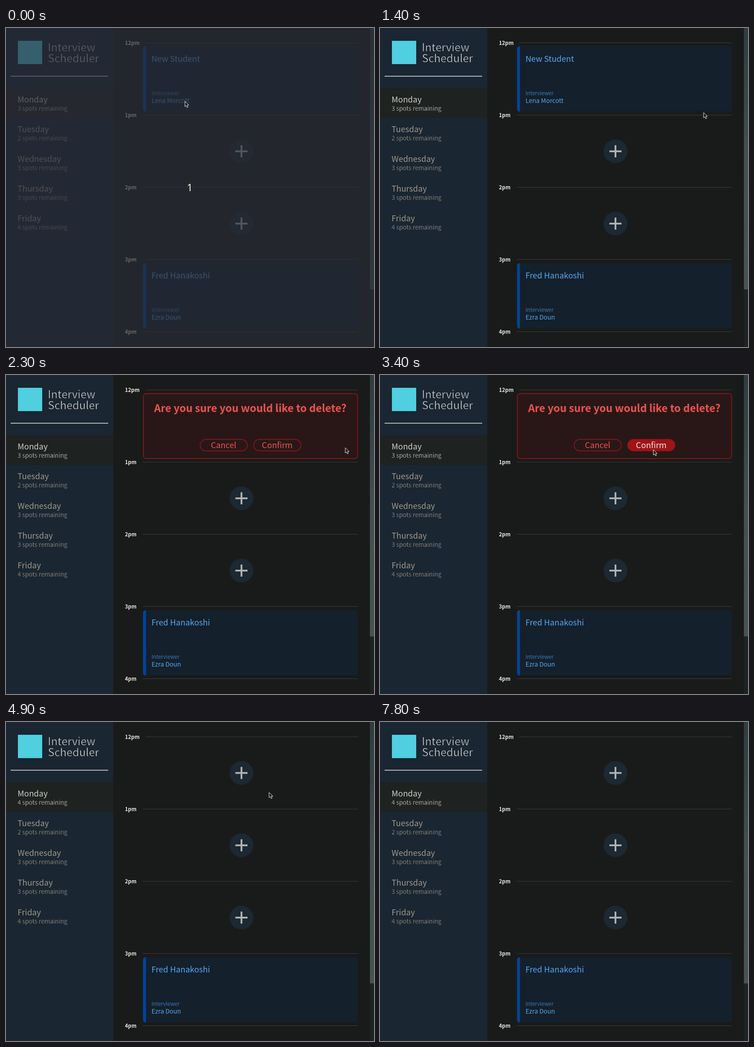
Recreate the animation shown at these times as an HTML page. Size 803 by 698 pixels, loop 8100 ms.

```html
<!DOCTYPE html>
<html lang="en">
<head>
<meta charset="utf-8">
<title>Scheduler</title>
<style>
  html, body { margin: 0; width: 100%; height: 100%; overflow: hidden; background: #191b1a; }
  svg { display: block; width: 803px; height: 698px; }
  text { font-family: "Noto Sans CJK JP", "Noto Sans CJK SC", "Noto Sans CJK KR", "Noto Sans", sans-serif; white-space: pre; }
</style>
</head>
<body>
<svg id="stage" viewBox="0 0 803 698" xmlns="http://www.w3.org/2000/svg">
  <defs>
    <linearGradient id="strip" x1="0" y1="0" x2="0" y2="1">
      <stop offset="0" stop-color="#2f3c40"/>
      <stop offset=".5" stop-color="#43504f"/>
      <stop offset="1" stop-color="#465350"/>
    </linearGradient>
  </defs>
</svg>
<script>
const NS = 'http://www.w3.org/2000/svg';
const stage = document.getElementById('stage');
const LOOP = 8100, STEP = 100, HOUR = 158.1;
const SIDE = '#1a2631', ROW = '#1e2220', PALE = '#e8e6e3', BLUE = '#004499', RED = '#a01316', CORAL = '#ef5350';

function add(parent, tag, attrs) {
  const el = document.createElementNS(NS, tag);
  for (const k in attrs) el.setAttribute(k, attrs[k]);
  parent.appendChild(el);
  return el;
}
const group = (parent = stage) => add(parent, 'g', {});
const rect = (p, x, y, width, height, fill, more) => add(p, 'rect', { x, y, width, height, fill, ...more });
const line = (p, x1, y1, x2, y2, stroke, w) => add(p, 'line', { x1, y1, x2, y2, stroke, 'stroke-width': w });
function text(p, str, x, y, size, fill, more) {
  const el = add(p, 'text', { x, y, 'font-size': size, fill, ...more });
  el.textContent = str;
  return el;
}
// a stroke in the background colour slims the letters
const slim = (bg, w) => ({ stroke: bg, 'stroke-width': w });
const bold = { 'font-weight': 700 };
const middle = { 'text-anchor': 'middle' };
const show = (el, on) => el.setAttribute('visibility', on ? 'visible' : 'hidden');
const paint = (el, fill) => el.setAttribute('fill', fill);

// page
rect(stage, 0, 0, 803, 698, '#191b1a');
rect(stage, 0, 0, 234, 698, SIDE);
rect(stage, 794, 0, 9, 698, '#1d2322');
rect(stage, 794, 0, 9, 572, 'url(#strip)');

// sidebar
rect(stage, 26, 28, 53, 51, '#4fcfe0');
text(stage, 'Interview', 91.3, 51, 23.6, PALE, slim(SIDE, .7));
text(stage, 'Scheduler', 91.6, 74.5, 23.6, PALE, slim(SIDE, .7));
line(stage, 10, 105.5, 223, 105.5, PALE, 1.4);
rect(stage, 0, 132, 234, 65, ROW);
const spots = [['Monday', 3], ['Tuesday', 2], ['Wednesday', 3], ['Thursday', 3], ['Friday', 4]].map(([day, n], i) => {
  const y = 65 * i, tone = i ? '#9f988d' : '#d0ccc6', bg = i ? SIDE : ROW;
  text(stage, day, 25.2, 163 + y, 17.6, tone);
  return text(stage, n + ' spots remaining', 25.3, 181 + y, 13.15, tone, slim(bg, .25));
});

// hours
['12pm', '1pm', '2pm', '3pm', '4pm'].forEach((label, i) => {
  const y = Math.round(32 + HOUR * i) + .5;
  text(stage, label, 259.5, y + 4.5, 11.5, PALE, bold);
  line(stage, i ? 298 : 304, y, 768, y, '#3a3d3c', 1);
});

function plus(y) {
  const g = group();
  add(g, 'circle', { cx: 513.8, cy: y, r: 26, fill: '#1c2832' });
  line(g, 500.5, y, 527, y, '#b2b5b6', 3.8);
  line(g, 513.8, y - 13.2, 513.8, y + 13.2, '#b2b5b6', 3.8);
  return g;
}
const free = plus(111.5);
plus(269.8);
plus(428);

function card(y, student, interviewer) {
  const g = group();
  const body = add(g, 'path', { d: `M305 ${y}H762q6 0 6 6v131q0 6 -6 6H305z` });
  add(g, 'path', { d: `M305.5 ${y}q-6.5 0 -6.5 6v131q0 6 6.500 6z`, fill: BLUE });
  const name = text(g, student, 317.4, y + 34, 17.6);
  const role = text(g, 'Interviewer', 317.4, y + 107, 11.5);
  const who = text(g, interviewer, 317.5, y + 123.5, 13.65);
  const icons = add(g, 'g', { transform: `translate(0 ${y - 40})`, fill: 'none', stroke: '#b3c3d8', 'stroke-width': 1.8, 'stroke-linejoin': 'round' });
  add(icons, 'path', { d: 'M715 148.5H705.5q-1.6 0 -1.6 1.6v13q0 1.6 1.6 1.6h13.5q1.6 0 1.6 -1.6v-6.5M711 158l.8 -4L720.5 145.6l3.4 3.4L715 157.3zM718.3 147.8l3.4 3.4' });
  add(icons, 'path', { d: 'M731 149h17.5M736.5 149l1 -3h4.5l1 3M733.2 149v14.5q0 1.5 1.5 1.5h10q1.5 0 1.5 -1.5V149M736.8 152.5v9M739.8 152.5v9M742.8 152.5v9' });
  const hover = on => {
    paint(body, on ? BLUE : '#14202b');
    paint(name, on ? '#dcdad6' : '#55a7f2');
    paint(role, on ? '#a9b6c9' : '#3a7abc');
    paint(who, on ? '#dcdad6' : '#55a7f2');
    show(icons, on);
  };
  hover(false);
  return { g, hover };
}
const booked = card(40, 'New Student', 'Lena Morcott');
card(514.4, 'Fred Hanakoshi', 'Ezra Doun');

// delete question
const ask = group();
rect(ask, 299.7, 40.7, 467.6, 142, '#291718', { rx: 6, stroke: RED, 'stroke-width': 1.4 });
text(ask, 'Are you sure you would like to delete?', 533, 80.5, 22.7, CORAL, { ...bold, ...middle });
function button(x, label) {
  const box = rect(ask, x, 141, 103, 25, '#291718', { rx: 12.5, stroke: RED, 'stroke-width': 1.4 });
  const word = text(ask, label, x + 51.3, 160.3, 17.8, CORAL, middle);
  return on => {
    paint(box, on ? RED : '#291718');
    paint(word, on ? PALE : CORAL);
  };
}
button(423.5, 'Cancel');
const confirmHover = button(540.5, 'Confirm');

// progress
const busy = group();
rect(busy, 299, 40, 469, 143, SIDE, { rx: 6 });
const ring = { fill: 'none', 'stroke-width': 3.5 };
add(busy, 'circle', { cx: 462.5, cy: 112, r: 17.8, stroke: '#3b464f', ...ring });
const arc = add(busy, 'path', { d: 'M480.3 112A17.8 17.8 0 0 1 462.5 129.8', stroke: '#f0eeea', ...ring });
text(busy, 'Deleting...', 566, 120, 22.7, PALE, { ...bold, ...middle });

// countdown
const dim = group();
rect(dim, 0, 0, 803, 698, '#292c35', { opacity: .68 });
text(dim, '1', 401, 357, 22, '#f8f8dc', { ...middle, style: 'font-family:"Noto Sans",sans-serif' });

const pointer = add(stage, 'path', {
  d: 'M.5 .5V12L3.2 9.6L5.2 14L7.2 13.1L5.3 8.8H8.9Z',
  fill: '#14161a', stroke: '#e6e6e6', 'stroke-width': 1, 'stroke-linejoin': 'round'
});

// pointer path: time, x, y
const path = [
  [0, 390, 160], [100, 386.5, 178], [200, 378, 220], [300, 374, 250],
  [600, 374, 250], [800, 458, 246], [1000, 556, 238.5],
  [1100, 556, 238.5], [1200, 600, 224], [1400, 705.5, 184.5], [1600, 733, 166], [2000, 739.8, 158.6],
  [2900, 739.8, 158.6], [3100, 702, 177], [3200, 660, 181], [3400, 596, 163], [3600, 573.5, 153.5],
  [6100, 573.5, 153.5], [6200, 490, 168], [6400, 268, 187],
  [6500, 268, 187], [6700, 200, 191], [6900, 110, 178], [7100, 58, 169], [7300, 36, 177],
  [7500, 36, 177], [7600, 35, 125], [7700, 46, 23], [7800, 50, -40], [LOOP, 50, -40]
];
function pointerAt(t) {
  const i = path.findIndex(p => p[0] > t);
  const [a, b] = [path[i - 1], path[i]];
  const k = (t - a[0]) / (b[0] - a[0]);
  return [a[1] + (b[1] - a[1]) * k, a[2] + (b[2] - a[2]) * k];
}
const inside = (x, y, l, t, r, b) => x >= l && x <= r && y >= t && y <= b;

function draw(ms) {
  const t = Math.floor((ms % LOOP) / STEP) * STEP;
  const [x, y] = pointerAt(t);
  pointer.setAttribute('transform', `translate(${x} ${y})`);

  const mode = t < 2300 ? 'card' : t < 3900 ? 'ask' : t < 4800 ? 'busy' : 'free';
  const put = (el, name) => el.setAttribute('display', mode === name ? 'inline' : 'none');
  put(booked.g, 'card');
  put(ask, 'ask');
  put(busy, 'busy');
  put(free, 'free');

  booked.hover(t >= 100 && inside(x, y, 299, 40, 768, 183));
  confirmHover(inside(x, y, 540, 141, 644, 166));
  arc.setAttribute('transform', `rotate(${98 + (t - 3900) * .36} 462.5 112)`);
  spots[0].textContent = (mode === 'free' ? 4 : 3) + ' spots remaining';
  show(dim, t < 100);
}

let start;
function tick(now) {
  if (start === undefined) start = now;
  draw(now - start);
  requestAnimationFrame(tick);
}
draw(0);
requestAnimationFrame(tick);
</script>
</body>
</html>
```
